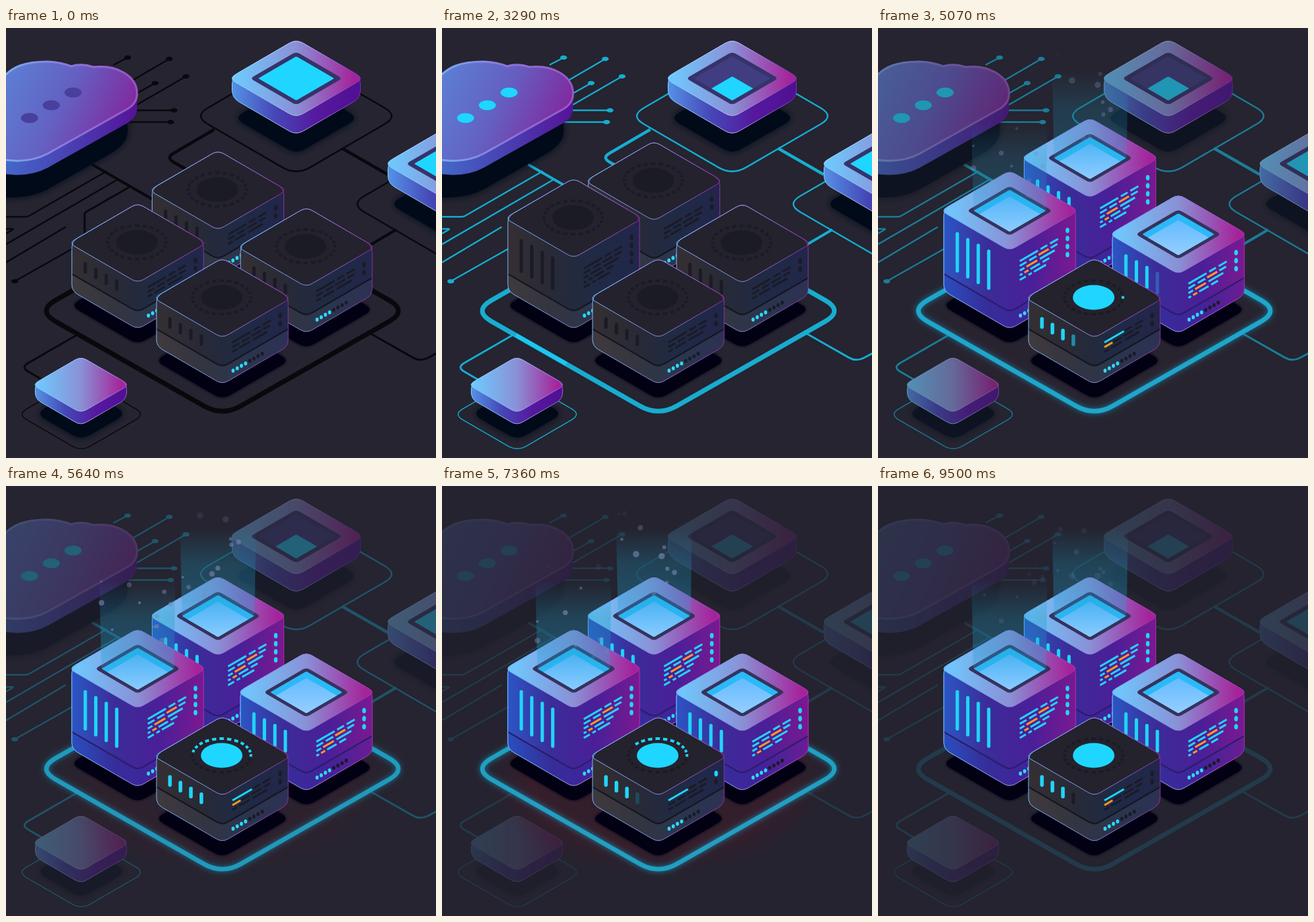
Write an HTML page with a canvas that moves like this. It is 640 px wide and 640 px high and loops after 9570 ms.

```html
<!DOCTYPE html>
<html>
<head>
<meta charset="utf-8">
<style>
  html, body { margin: 0; width: 100%; height: 100%; overflow: hidden; background: #252430; }
  canvas { display: block; }
</style>
</head>
<body>
<canvas id="stage" width="640" height="640"></canvas>
<script>
const ctx = document.getElementById('stage').getContext('2d');
const LOOP = 9570, SLOPE = 0.58, FLOOR_SLOPE = 0.57;
const BG = '#252430', CYAN = '#1ed6ff', LINE_ON = '#19acd0', ORANGE = '#ff9a1f', INK = '#1b1b26';
const CHIP_SHADOW = '#010a19', CUBE_SHADOW = '#020013';
const TOP = ['#70c6fb', '#8a90d6', '#a5239a'];
const CHIP_SIDE = ['#5592e6', '#4547b6', '#56189e', '#4f1092'];
const DARK = { top: ['#24222d', '#24222d'], side: ['#352f33', '#282a36', '#1f2a45', '#22264a'], seam: '#15161f', band: '#ffffff0d' };
const LIT = { top: TOP, side: ['#2b56c4', '#3b2c98', '#4a1f98', '#7a1990'], seam: '#2b1d6b', band: '#2030a030' };
const CODE = [
  [[0, 27], [31, 10], [45, 12]],
  [[0, 10], [14, 11], [28, 15, 1], [46, 10]],
  [[0, 7], [10, 16, 1], [30, 22]],
  [[0, 4], [7, 6, 1], [16, 14], [34, 10]],
  [[0, 9], [13, 5], [21, 18]]
];

const clamp = v => Math.max(0, Math.min(1, v));
const ramp = (t, a, b) => clamp((t - a) / (b - a));
const ease = p => p < 0.5 ? 2 * p * p : 1 - 2 * (1 - p) * (1 - p);
const bump = (t, at, half) => Math.max(0, 1 - Math.abs(t - at) / half);
const rand = n => { const v = Math.sin(n * 127.1 + 3.7) * 43758.5453; return v - Math.floor(v); };

// value at t on a smooth curve through [time, value] keys
function track(t, keys) {
  let [t0, v0] = keys[0];
  for (const [t1, v1] of keys) {
    if (t < t1) return v0 + (v1 - v0) * ease(ramp(t, t0, t1));
    [t0, v0] = [t1, v1];
  }
  return v0;
}

function toward(a, b, d) {
  const k = Math.min(0.5, d / Math.hypot(b[0] - a[0], b[1] - a[1]));
  return [a[0] + (b[0] - a[0]) * k, a[1] + (b[1] - a[1]) * k];
}

function rounded(pts, d, open) {
  const path = new Path2D(), n = pts.length;
  pts.forEach((p, i) => {
    if (open && (i === 0 || i === n - 1)) return i ? path.lineTo(...p) : path.moveTo(...p);
    const a = toward(p, pts[(i + n - 1) % n], d), b = toward(p, pts[(i + 1) % n], d);
    i ? path.lineTo(...a) : path.moveTo(...a);
    path.quadraticCurveTo(...p, ...b);
  });
  if (!open) path.closePath();
  return path;
}

function rhomb(x, y, hw, d, slope = SLOPE) {
  const w = hw + 0.433 * d, h = w * slope;
  return rounded([[x, y - h], [x + w, y], [x, y + h], [x - w, y]], d);
}

function gradient(x0, x1, colors, y0 = 0, y1 = 0) {
  const g = ctx.createLinearGradient(x0, y0, x1, y1);
  colors.forEach((c, i) => g.addColorStop(i / (colors.length - 1), c));
  return g;
}

function fill(path, color) { ctx.fillStyle = color; ctx.fill(path); }
function stroke(path, color, width) { ctx.strokeStyle = color; ctx.lineWidth = width; ctx.stroke(path); }

function oval(x, y, rx, ry, color) {
  ctx.fillStyle = color;
  ctx.beginPath();
  ctx.ellipse(x, y, rx, ry, 0, 0, 7);
  ctx.fill();
}

function segment(x0, y0, x1, y1, width, color) {
  ctx.strokeStyle = color;
  ctx.lineWidth = width;
  ctx.beginPath();
  ctx.moveTo(x0, y0);
  ctx.lineTo(x1, y1);
  ctx.stroke();
}

function shadow(path, color, blur) {
  ctx.save();
  ctx.shadowColor = color;
  ctx.shadowBlur = blur;
  fill(path, color);
  ctx.restore();
}

// isometric block whose top face is centred on x, y
function slab(x, y, hw, h, d, top, side, edge, band) {
  const w = hw + 0.433 * d, e = 0.25 * d, v = w * SLOPE;
  const hull = rounded([[x, y - v], [x + hw, y - e], [x + hw, y + h + e], [x, y + v + h], [x - hw, y + h + e], [x - hw, y - e]], d);
  const face = rhomb(x, y, hw, d);
  fill(hull, gradient(x - hw, x + hw, side));
  if (band) {
    const s = y + h - 23, r = hw * SLOPE;
    ctx.save();
    ctx.clip(hull);
    fill(rounded([[x - hw, s], [x, s + r], [x + hw, s], [x + hw, s + 99], [x - hw, s + 99]], 6), band.band);
    stroke(rounded([[x - hw, s], [x, s + r], [x + hw, s]], 10, true), band.seam, 2.2);
    ctx.restore();
  }
  fill(face, gradient(x - hw * 0.9, x + hw * 0.9, top));
  stroke(face, gradient(x - hw, x + hw, edge), 1);
  stroke(hull, gradient(x - hw, x + hw, edge), 1);
}

function chip(x, y, sink) {
  slab(x, y, 95.5, 26, 12, TOP, CHIP_SIDE, ['#7fd0ff', '#b9b2f5', '#7a2cb8']);
  fill(rhomb(x, y, 66, 6), '#36336a');
  const screen = rhomb(x, y, 56, 2);
  fill(screen, '#403d80');
  ctx.save();
  ctx.clip(screen);
  fill(rhomb(x, y + sink, 56, 2), CYAN);
  ctx.restore();
}

function cloudShape(dy) {
  return new Path2D(`M-10 ${80 + dy}C8 ${56 + dy} 30 ${50 + dy} 62 ${50 + dy}Q82 ${51 + dy} 97 ${57 + dy}
    Q112 ${52 + dy} 130 ${58 + dy}C166 ${54 + dy} 194 ${72 + dy} 195 ${96 + dy}
    Q196 ${113 + dy} 178 ${122 + dy}L62 ${187 + dy}Q32 ${203 + dy} -10 ${195 + dy}Z`);
}

function cloud(t) {
  shadow(new Path2D('M-10 150L170 110Q188 150 177 168Q170 178 157 186L62 240Q32 256 -10 251Z'), CHIP_SHADOW, 12);
  const side = gradient(0, 195, ['#4468c8', '#493fb2', '#561298']);
  for (let dy = 21; dy > 0; dy -= 1.5) fill(cloudShape(dy), side);
  fill(cloudShape(0), gradient(0, 195, ['#5b82d6', '#6460c2', '#84249a'], 40, 130));
  stroke(cloudShape(0), gradient(0, 195, ['#7ba8ec', '#8d74d8', '#9a55c2']), 3);
  const wave = t % 1125, solid = ramp(t, 1600, 1950);
  for (let i = 0; i < 3; i++) {
    const x = 35 + i * 32.4, y = 134 - i * 19;
    oval(x, y, 12.8, 7.4, '#48409c');
    ctx.globalAlpha = Math.max(solid, bump(wave, 250 + i * 250, 250));
    oval(x, y, 12.8, 7.4, CYAN);
    ctx.globalAlpha = 1;
  }
}

const platform = rhomb(322, 421, 262, 32, FLOOR_SLOPE);
const floorEdge = x => 578 - Math.abs(x - 322) * FLOOR_SLOPE;
const wires = [
  [[[160, 55], [181, 44]], 2.5, 1], [[[188, 78], [243, 46]], 2.5, 1], [[[190, 100], [222, 82]], 2.5, 1],
  [[[190, 117], [268, 72]], 2.5, 1], [[[185, 122.5], [250, 122.5]], 2.5, 1], [[[170, 140], [245, 140]], 2.5, 1],
  [[[128, 203], [225, 259]], 4],
  [[[0, 281], [32, 281], [150, 213]], 2.5], [[[0, 322], [167, 225]], 2.5], [[[0, 349], [89, 296]], 2.5],
  [[[105, 325], [13, 377]], 2.5, 1], [[[0, 299], [12, 299], [0, 306]], 2.5],
  [[[117, 310], [117, 275], [183, 237]], 3],
  [[[310, 151], [238, 193], [290, 223]], 4.5], [[[500, 179], [568, 218]], 4.5],
  [[[581, 300], [530, 330]], 4], [[[543, 455], [617, 497], [650, 479]], 3],
  [[[107, 456], [22, 505], [60, 527]], 3]
];

function circuit(color) {
  for (const [pts, width, end] of wires) {
    stroke(rounded(pts, pts[0][0] > 120 || pts[0][0] === 107 ? 13 : 3, true), color, width);
    if (end) oval(...pts[pts.length - 1], 5.2, 3.3, color);
  }
  stroke(rhomb(432, 131, 142, 24), color, 2.5);
  stroke(rhomb(664, 262, 141, 24), color, 2.5);
  stroke(rhomb(112, 575, 88, 16), color, 1.5);
  stroke(platform, color, 7);
}

function details(x, y, rise, color, accent, lastSlot) {
  const base = ctx.globalAlpha;
  ctx.lineCap = 'round';
  for (let i = 0; i < 4; i++) {
    const sx = x - 78 + i * 15.6, sy = y + i * 8.6;
    if (i === 3) ctx.globalAlpha = base * lastSlot;
    segment(sx, sy + 31 + rise * 0.07, sx, sy + 43 + rise * 0.97, 5, color);
  }
  ctx.globalAlpha = base;
  ctx.lineCap = 'butt';
  CODE.slice(0, 3 + Math.floor(rise / 18)).forEach((row, r) =>
    row.forEach(([u, len, hot]) => codeBar(x, y, rise, r, u, len, hot ? accent : color)));
  const dots = 2 + Math.floor(rise / 18);
  for (let i = 0; i < dots; i++) oval(x + 86, y + 26 + rise * 0.07 + i * 12, 2.8, 4, color);
}

function codeBar(x, y, rise, row, u, len, color) {
  const x0 = x + 15 + u, y0 = y + 66 + Math.min(9, rise * 0.4) + row * 7 - u * SLOPE;
  segment(x0, y0, x0 + len, y0 - len * SLOPE, 3, color);
}

function badge(x, y, glow, count) {
  oval(x - 1, y - 1, 31, 18.5, INK);
  ctx.save();
  ctx.globalAlpha *= glow;
  oval(x - 1, y - 1, 31, 18.5, CYAN);
  ctx.restore();
  for (let i = 0; i < 24; i++) {
    const a = -i * Math.PI / 12;
    ctx.beginPath();
    ctx.ellipse(x - 1, y - 1, 43.5, 25, 0, a - 0.075, a + 0.075);
    ctx.strokeStyle = i < count ? CYAN : INK;
    ctx.lineWidth = 4;
    ctx.stroke();
  }
}

function leds(x, y) {
  for (let i = 0; i < 8; i++)
    oval(x + 16 + i * 6.2, y + 108 - i * 3.6, 2.4, 3, i < 4 ? '#2fd8f8' : INK);
}

function darkCube(x, y, rise) {
  slab(x, y, 98, 69 + rise, 10, DARK.top, DARK.side, ['#78b8ff', '#8a86d8', '#8c30a4'], DARK);
  details(x, y, rise, INK, INK, 1);
}

function cube(x, y0, rise, lit, lastSlot) {
  const y = y0 - rise;
  darkCube(x, y, rise);
  badge(x, y, 0, 0);
  if (lit) {
    ctx.globalAlpha = lit;
    slab(x, y, 98, 69 + rise, 10, LIT.top, LIT.side, ['#6fb4ff', '#8f88dc', '#a52ba8'], LIT);
    details(x, y, rise, '#22d4f8', ORANGE, lastSlot);
    fill(rhomb(x, y, 61, 6), '#36325e');
    const screen = rhomb(x, y, 53, 2);
    fill(screen, '#2bb9f7');
    ctx.save();
    ctx.clip(screen);
    fill(rhomb(x, y + 10, 53, 2), gradient(0, 0, ['#64bcff', '#96ceff'], y - 20, y + 32));
    ctx.restore();
    ctx.globalAlpha = 1;
  }
  leds(x, y0);
}

function frontCube(t) {
  const x = 322, y = 402, on = ramp(t, 4300, 4800);
  darkCube(x, y, 0);
  const first = t < 6300;
  const count = first ? Math.ceil(ramp(t, 5020, 6300) * 24) : t < 9000 ? Math.ceil(ramp(t, 6380, 8820) * 24) : 0;
  badge(x, y, first ? on : track(t, [[6300, 1], [6450, 0.15], [6600, 0.15], [7000, 1]]), count);
  leds(x, y);
  if (!on) return;
  ctx.globalAlpha = on;
  ctx.lineCap = 'round';
  for (let i = 0; i < 4; i++) {
    if (i === 3) ctx.globalAlpha = on * (0.5 + 0.5 * Math.cos((t - 8210) / 2580 * Math.PI * 2));
    segment(x - 78 + i * 15.6, y + 31 + i * 8.6, x - 78 + i * 15.6, y + 43 + i * 8.6, 5.5, '#22d4f8');
  }
  ctx.lineCap = 'butt';
  ctx.globalAlpha = on;
  codeBar(x, y, 0, 0, 0, 29, CYAN);
  if (t < 5900 || t > 9000) codeBar(x, y, 0, 1, 0, 12, ORANGE);
  else oval(x + 86, y + 26, 2.8, 4.2, CYAN);
  ctx.globalAlpha = 1;
}

function beam(x, y, alpha) {
  ctx.globalAlpha = alpha;
  fill(new Path2D(`M${x - 57} ${y - 131}H${x + 56}L${x + 54} ${y}L${x} ${y + 31}L${x - 54} ${y}Z`),
    gradient(0, 0, ['#1c8fb400', '#1c8fb44c', '#1c9fd058', '#40b8ff22'], y - 131, y + 31));
  ctx.globalAlpha = 1;
}

function particles(t) {
  const strength = ramp(t, 4700, 5300) * (1 - 0.7 * ramp(t, 8900, 9450));
  for (let i = 0; i < 24; i++) {
    const [x, y] = i % 2 ? [316, 193] : [196, 272];
    const life = (t / (2200 + 900 * rand(i)) + rand(i + 40)) % 1;
    const r = 1.6 + 3.2 * rand(i + 120);
    ctx.globalAlpha = strength * 0.6 * Math.sin(life * Math.PI);
    oval(x + (rand(i + 80) - 0.5) * 112, y - life * 160, r, r, '#8088b8');
  }
  ctx.globalAlpha = 1;
}

function platformGlow(t) {
  const glow = track(t, [[4300, 0], [5000, 0.7], [6430, 0.55], [8100, 0.88], [9000, 0.7], [9480, 0]]);
  if (!glow) return;
  ctx.save();
  ctx.globalAlpha = glow * ramp(t, 4800, 6200);
  ctx.translate(322, 430);
  ctx.scale(1, SLOPE);
  const red = ctx.createRadialGradient(0, 0, 60, 0, 0, 260);
  red.addColorStop(0, '#4a102050');
  red.addColorStop(0.65, '#5a142470');
  red.addColorStop(1, '#4a102000');
  ctx.fillStyle = red;
  ctx.fillRect(-270, -270, 540, 540);
  ctx.restore();
  ctx.save();
  ctx.globalAlpha = glow;
  ctx.shadowColor = '#14a0d0';
  ctx.shadowBlur = 9;
  stroke(platform, '#22b4d8', 6.5);
  ctx.restore();
}

// two sparks leave the bottom corner and climb the platform edges
function sparks(t) {
  const age = t - 8080;
  if (age < 0 || age > 850) return;
  ctx.save();
  ctx.globalAlpha = 1 - ramp(age, 500, 850);
  ctx.shadowColor = CYAN;
  ctx.shadowBlur = 14;
  for (const x of [322 - age * 0.25, 322 + age * 0.25]) oval(x, Math.min(570, floorEdge(x)), 6.5, 6.5, '#25b8e0');
  ctx.restore();
}

function draw(t) {
  ctx.fillStyle = BG;
  ctx.fillRect(0, 0, 640, 640);
  circuit('#08080d');
  ctx.globalAlpha = ramp(t, 1550, 1980);
  if (ctx.globalAlpha) circuit(LINE_ON);
  ctx.globalAlpha = 1;

  if (t > 2070 && t < 3700) {
    const x = 245 - 135 * ease(ramp(t, 2070, 3250));
    ctx.globalAlpha = 1 - ramp(t, 3350, 3700);
    segment(x, floorEdge(x), x + 75, floorEdge(x + 75), 6, '#1cc6f0');
    ctx.globalAlpha = 1;
  }

  cloud(t);
  for (const [x, y, hw] of [[432, 134, 86], [664, 262, 86], [112, 574, 61]]) shadow(rhomb(x, y, hw, 16), CHIP_SHADOW, 12);
  chip(432, 75, 30 * ramp(t, 1250, 2200));
  chip(664, 202, 0);
  slab(111.5, 531, 68, 18.5, 10, TOP, CHIP_SIDE, ['#7fd0ff', '#9db0f5', '#a05ad0']);

  ctx.globalAlpha = 0.83 * ramp(t, 4350, 6000);
  ctx.fillStyle = BG;
  ctx.fillRect(0, 0, 640, 640);
  ctx.globalAlpha = 1;

  platformGlow(t);
  sparks(t);

  const lit = ramp(t, 4080, 4700);
  const late = ease(ramp(t, 2800, 4100));
  for (const [x, y] of [[316, 334], [196, 413], [447, 419], [322, 495]]) shadow(rhomb(x, y, 94, 14), CUBE_SHADOW, 5);
  cube(315.5, 241.5, 48 * late, lit, 1);
  cube(196, 320, 48 * ease(ramp(t, 2300, 3800)), lit, 1 - 0.7 * bump(t, 6430, 400));
  cube(447, 326, 19 * late, lit, 1 - 0.7 * bump(t, 5070, 400) - 0.3 * bump(t, 6430, 400));
  frontCube(t);

  const light = ramp(t, 4650, 5250);
  if (light) {
    beam(316, 193, light);
    beam(196, 272, light);
    particles(t);
  }
}

function tick() {
  draw(performance.now() % LOOP);
  requestAnimationFrame(tick);
}
tick();
</script>
</body>
</html>
```
